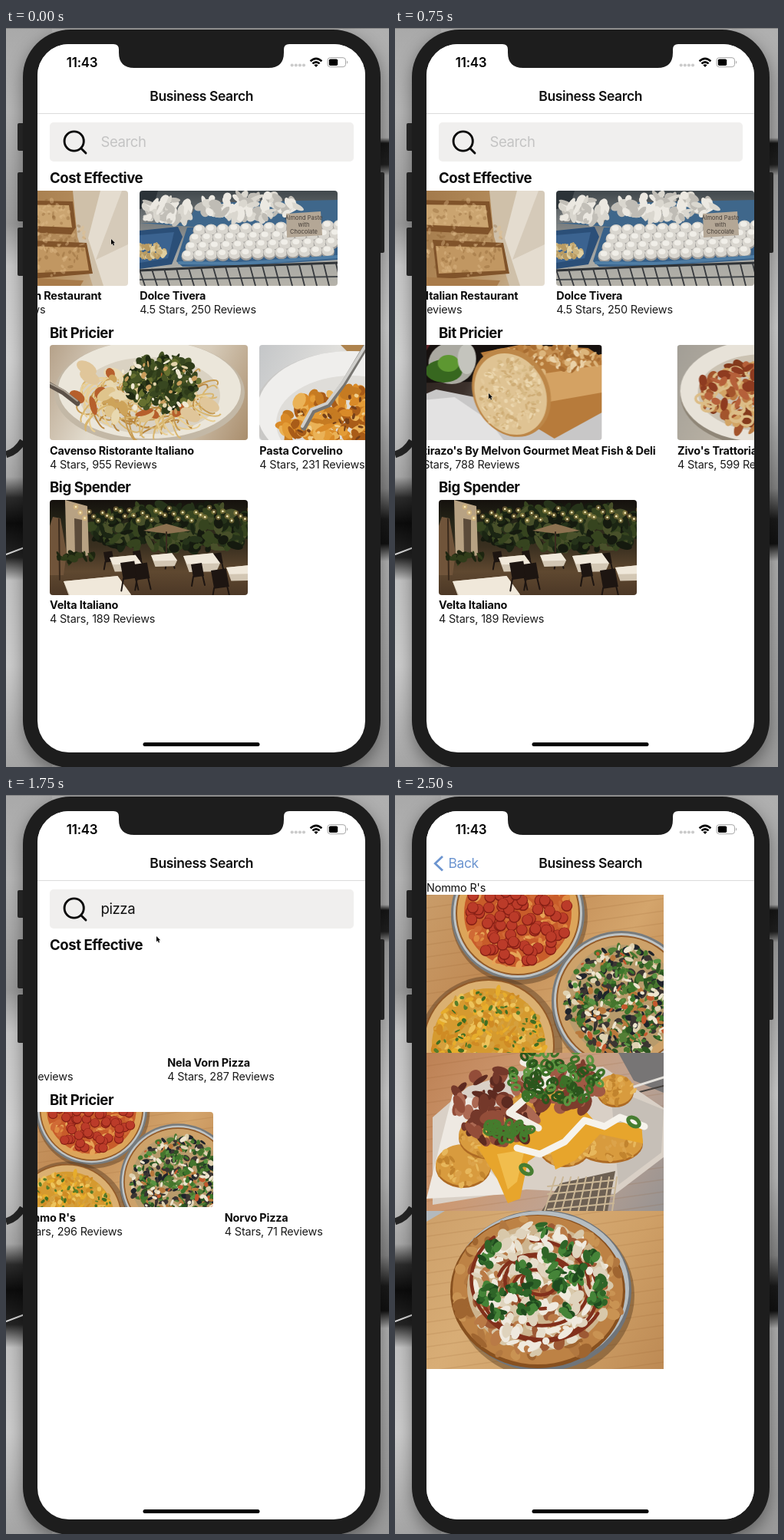
These frames come from a looping animation (499 px wide and 963 px high, 2750 ms). An HTML page with a canvas:

```html
<!DOCTYPE html>
<html lang="en">
<head>
<meta charset="utf-8">
<title>Business Search</title>
<style>
html, body { margin: 0; width: 100%; height: 100%; overflow: hidden; }
#stage { position: relative; width: 499px; height: 963px; overflow: hidden; background: #b4b4b4; font-family: Inter, Roboto, sans-serif; }
#stage div, #stage canvas, #stage svg { position: absolute; }
.layer { left: 0; top: 0; width: 499px; height: 963px; }
.text { line-height: 0; white-space: pre; }
#left, #right { top: 0; height: 963px; }
#left { left: 0; width: 60px; background: linear-gradient(#a9a9a9, #b6b6b6 110px, #9a9a9a 255px, #c8c8c8 310px, #d2d2d2 430px, #bdbdbd 530px, #a8a8a8 585px, #2c2c2c 612px, #0c0c0c 645px, #242424 690px, #c4c4c4 720px, #cdcdcd 830px, #a4a4a4); }
#right { right: 0; width: 60px; background: linear-gradient(#b0b0b0, #a8a8a8 143px, #161616 150px, #202020 178px, #9c9c9c 192px, #b8b8b8 300px, #d0d0d0 390px, #bcbcbc 500px, #858585 600px, #1a1a1a 640px, #111 672px, #b2b2b2 695px, #9a9a9a); }
#body { left: 21.5px; top: 2px; width: 466px; height: 962px; border-radius: 62px; background: #1d1d1d; box-shadow: 0 8px 22px rgba(0, 0, 0, .4); }
#screen { background: #fff; clip-path: inset(21px 31px 19px 41px round 41px); }
#bar { left: 57px; top: 123px; width: 395.5px; height: 51px; border-radius: 5px; background: #f0efee; }
#caret { left: 123.5px; top: 136px; width: 2px; height: 24px; background: #4a72e0; }
#detail { background: #fff; }
#shade { left: 83px; top: 112px; width: 9px; height: 851px; background: linear-gradient(90deg, rgba(0,0,0,0), rgba(0,0,0,.17)); }
#head { left: 0; top: 0; width: 499px; height: 111px; background: #fff; border-bottom: 1px solid #dcdcdc; }
</style>
</head>
<body>
<div id="stage">
  <div id="left"></div><div id="right"></div>
  <svg class="layer" viewBox="0 0 499 963">
    <path d="M0 .5H499" stroke="#858585"/>
    <path d="M0 556Q14 552 22 538" stroke="#252525" stroke-width="9" fill="none"/>
    <path d="M0 686L24 677" stroke="#d8d8d8" stroke-width="2"/>
    <g fill="#2a2a2a"><rect x="15" y="124" width="10" height="36" rx="2"/><rect x="15" y="188" width="10" height="64" rx="2"/><rect x="15" y="260" width="10" height="63" rx="2"/><rect x="483" y="188" width="10" height="105" rx="2"/></g>
  </svg>
  <div id="body"></div>
  <div id="screen" class="layer">
    <div id="home" class="layer">
      <div id="bar"></div>
      <svg class="layer" viewBox="0 0 499 963" fill="none" stroke="#0a0a0a" stroke-width="2.9" stroke-linecap="round"><circle cx="88.7" cy="147.5" r="12.6"/><path d="M98 157L104 163"/></svg>
      <div id="caret"></div>
    </div>
    <div id="detail" class="layer"></div>
    <div id="shade"></div>
    <div id="head"></div>
    <svg class="layer" viewBox="0 0 499 963">
      <path d="M140 20V21Q147 21 147 28V32Q147 52 167 52H342Q362 52 362 32V28Q362 21 369 21V20Z" fill="#1d1d1d"/>
      <g fill="#cbcbcb"><circle cx="372.7" cy="48.5" r="2.1"/><circle cx="377.8" cy="48.5" r="2.1"/><circle cx="382.9" cy="48.5" r="2.1"/><circle cx="388" cy="48.5" r="2.1"/></g>
      <g fill="none" stroke="#000" stroke-width="2.6"><path d="M396.6 43.2Q404 36.4 411.4 43.2"/><path d="M399.4 46.4Q404 42.2 408.6 46.4"/></g>
      <path d="M401.4 48.2Q404 46.2 406.6 48.2L404 51Z"/>
      <rect x="419" y="38.7" width="23.5" height="12" rx="3.4" fill="none" stroke="#a5a5a5"/>
      <rect x="420.8" y="40.4" width="11.4" height="8.6" rx="1.8"/>
      <path d="M444 42.6Q446.4 44.7 444 46.8Z" fill="#a5a5a5"/>
      <rect x="178.5" y="931" width="152" height="5" rx="2.5"/>
      <path id="chevron" d="M62 80L52.3 89.3L62 98.6" fill="none" stroke="#6c95d0" stroke-width="2.8"/>
    </svg>
  </div>
  <svg id="cursor" width="8" height="11" viewBox="-1 -1 8 11"><path d="M0 0V7.2L1.7 5.7L2.9 8.4L4.1 7.9L3 5.3H5.2Z" stroke="#fff" stroke-opacity=".7" stroke-width=".8" paint-order="stroke"/></svg>
</div>
<script>
const $ = id => document.getElementById(id);
const add = (box, tag, css) => {
  const el = document.createElement(tag);
  Object.assign(el.style, css);
  return box.appendChild(el);
};
const layer = box => add(box, 'div', { left: 0, top: 0 });
const text = (box, str, x, base, size, weight = 400, color = '#0c0c0c', shift = 0) => {
  const el = add(box, 'div', {
    left: x + 'px', top: base - .364 * size + 'px', fontSize: size + 'px', fontWeight: weight, color,
    letterSpacing: size > 17 ? '-.023em' : '-.013em', transform: `translateX(${shift}%)`
  });
  el.className = 'text';
  el.textContent = str;
  return el;
};

// Painting helpers, all drawing on the current context
let c;
const rng = seed => {
  let s = seed * 99991 + 7;
  return () => (s = s * 16807 % 2147483647) / 2147483647;
};
const ell = (col, x, y, rx, ry = rx, a = 0) => {
  c.fillStyle = col;
  c.beginPath();
  c.ellipse(x, y, rx, ry, a, 0, 7);
  c.fill();
};
const trace = p => {
  c.beginPath();
  for (let i = 0; i < p.length; i += 2) c.lineTo(p[i], p[i + 1]);
};
const poly = (col, ...p) => { c.fillStyle = col; trace(p); c.fill(); };
const line = (col, w, ...p) => {
  c.strokeStyle = col; c.lineWidth = w; c.lineCap = c.lineJoin = 'round';
  trace(p); c.stroke();
};
const ring = (col, w, x, y, rx, ry = rx, a = 0, from = 0, to = 7) => {
  c.strokeStyle = col; c.lineWidth = w;
  c.beginPath();
  c.ellipse(x, y, rx, ry, a, from, to);
  c.stroke();
};
const wash = (x, y, ...cols) => {
  const g = c.createLinearGradient(0, 0, x, y);
  cols.forEach((col, i) => g.addColorStop(i / (cols.length - 1), col));
  c.fillStyle = g;
  c.fillRect(0, 0, 320, 210);
};
const spread = (seed, n, x, y, rx, ry, draw) => {
  const r = rng(seed);
  for (let i = 0; i < n; i++) {
    const a = r() * 6.283, d = Math.sqrt(r());
    draw(x + Math.cos(a) * d * rx, y + Math.sin(a) * d * ry, r);
  }
};
const bits = (seed, n, x, y, rx, ry, size, ...cols) => spread(seed, n, x, y, rx, ry, (px, py, r) =>
  ell(cols[r() * cols.length | 0], px, py, size * (.5 + r()), size * (.3 + r() * .6), r() * 3));

function toast() {
  wash(258, 124, '#8f6a42', '#a37a4b', '#b58d5c', '#cfc0a8');
  poly('#cfc0a9', 186, 0, 258, 0, 258, 124, 212, 124, 192, 60);
  poly('#e4dccf', 222, 0, 258, 0, 258, 124, 226, 124, 206, 62);
  poly('#d5cab9', 250, 0, 258, 0, 258, 70, 216, 90);
  poly('#80532a', 90, 12, 186, 14, 190, 48, 184, 57, 90, 52);
  poly('#caa470', 90, 18, 181, 19, 185, 48, 90, 44);
  poly('#80532a', 112, 64, 204, 68, 212, 108, 118, 116);
  poly('#c19762', 116, 72, 202, 74, 207, 104, 120, 108);
  poly('#a87b4a', 90, 112, 200, 117, 196, 124, 90, 124);
  bits(3, 160, 150, 62, 52, 50, 3, 'rgba(225,190,140,.4)', 'rgba(130,85,40,.3)');
}
function sweets() {
  wash(0, 124, '#41484c', '#777c7e', '#a4a5a2', '#b6b3aa');
  poly('#2c3338', 0, 0, 24, 0, 18, 20, 0, 24);
  poly('#3f678b', 0, 42, 62, 42, 76, 16, 258, 12, 258, 42, 68, 47);
  bits(5, 55, 36, 26, 34, 15, 7, '#d9d6ce', '#c2bfb8', '#ebe8e1');
  bits(6, 110, 142, 21, 64, 17, 7, '#dad7cf', '#bfbcb5', '#ece9e2');
  poly('#386189', 48, 92, 62, 48, 258, 40, 258, 90, 130, 98, 56, 99);
  for (let j = 0; j < 4; j++) for (let i = 0; i < 13; i++) {
    const x = 78 - j * 5 + i * 15.2, y = 51 + j * 11 - i * .5;
    ell('#9d9b98', x, y + 1.5, 8.6, 8);
    ell('#d9d6cf', x, y, 8, 7);
    ell('#f0eee8', x - 1, y - 2, 4.5, 3.4);
  }
  poly('#2b4f78', 0, 52, 50, 47, 56, 60, 42, 96, 0, 102);
  poly('#3b6390', 0, 58, 45, 54, 37, 88, 0, 94);
  bits(8, 60, 14, 79, 20, 9, 4, '#cbb27c', '#b99b62', '#e0cfa0');
  line('#4f7da4', 4, 52, 94, 130, 95, 258, 86);
  line('#2f3337', 3, 0, 104, 110, 99, 258, 94);
  line('#474b4e', 2, 0, 116, 258, 112);
  for (let i = 0; i < 17; i++) line('#36393d', 1.8, i * 16, 103 - i * .5, i * 16 + 7, 124);
  poly('#b4a796', 191, 30, 236, 27, 238, 58, 192, 61);
  c.fillStyle = '#463e38'; c.font = '7.5px Inter, sans-serif'; c.textAlign = 'center';
  ['Almond Paste', 'with', 'Chocolate'].forEach((s, i) => c.fillText(s, 214, 38 + i * 9));
}
function greens() {
  wash(258, 124, '#b5a189', '#e2dbcd', '#d6cbb9', '#a98d6c');
  ell('#c3b8a6', 130, 62, 124, 68);
  ell('#ebe6da', 130, 58, 119, 64);
  ell('#dad2c2', 130, 66, 92, 50);
  spread(11, 110, 128, 76, 88, 34, (x, y, r) =>
    ring(['#d9b66f', '#c79b51', '#e9cf94', '#b8863f'][r() * 4 | 0], 2, x, y, 10 + r() * 18, 4 + r() * 7, r() * 3, 0, 3.6));
  bits(12, 40, 108, 66, 76, 34, 9, '#dfc48c', '#b65f2c', '#e8d8b0', '#cda35a');
  bits(13, 230, 146, 50, 48, 36, 6, '#2e3b19', '#465424', '#1f2912', '#66702f', '#384720');
  bits(14, 45, 140, 55, 60, 38, 3.5, '#e4d4ab', '#c99d5c', '#f0e8d2');
  [[52, 42], [48, 30], [183, 91], [208, 78]].forEach(p => ell('#e0c69a', ...p, 14, 8, .5));
  line('#5b5148', 7, 0, 52, 18, 62, 36, 76);
  line('#aaa092', 2, 0, 50, 18, 59, 36, 73);
}
function penne() {
  wash(258, 124, '#c4c6c8', '#e0dfdc', '#c2a684', '#513022');
  poly('#ae834d', 106, 0, 160, 0, 160, 12, 120, 14);
  ell('#c9c8c6', 118, 90, 126, 82);
  ell('#efeeec', 118, 86, 121, 78);
  ell('#dfddd9', 120, 102, 98, 62);
  bits(21, 240, 112, 104, 83, 46, 9, '#c67b22', '#e39c37', '#a95c18', '#d98a28', '#eab257');
  bits(22, 35, 104, 96, 60, 34, 3, '#75401a', '#f0cf8e');
  line('#777571', 7, 140, 0, 110, 50, 90, 78, 70, 86, 58, 108);
  line('#d0cfcc', 4, 139, 0, 108, 50, 88, 76, 68, 84, 56, 106);
  poly('#4c3324', 238, 0, 258, 0, 258, 124, 238, 124);
  poly('#a04b2c', 238, 52, 258, 45, 258, 82, 238, 88);
  poly('#26374a', 238, 92, 258, 90, 258, 118, 238, 118);
}
function calamari() {
  wash(258, 124, '#9a4a2a', '#833219', '#a04722', '#8a3115');
  ell('#b5aea0', 130, 64, 122, 75);
  ell('#eeeae0', 130, 59, 121, 72);
  ell('#dfd9cb', 128, 60, 100, 58);
  bits(31, 120, 104, 62, 82, 50, 9, '#d1a667', '#dcb87e', '#c4914e');
  spread(32, 85, 108, 65, 88, 52, (x, y, r) => {
    const w = 7 + r() * 6, a = r() * 3;
    ring('#ad793a', 6.5, x, y + 1, w, w * .7, a);
    ring(['#dfbb81', '#e9cc99', '#d2a560'][r() * 3 | 0], 5, x, y, w, w * .7, a);
  });
  bits(33, 28, 100, 38, 45, 28, 2.5, '#4c5528', '#6a6a32');
  ell('#cfc8bb', 141, 4, 26, 16); ell('#f1e9d5', 141, 1, 22, 13);
  ell('#b9b2a7', 195, 32, 28, 21); ell('#f2efe9', 195, 30, 27, 20);
  ell('#8f1d12', 195, 28, 22, 15); ell('#bd3522', 196, 29, 17, 10);
}
function loaf() {
  wash(258, 124, '#241c19', '#3b302b', '#a49e98', '#c7c3bd');
  poly('#16110f', 0, 0, 258, 0, 258, 22, 90, 48, 0, 50);
  poly('#5a2024', 0, 0, 34, 0, 26, 12, 0, 16);
  ell('#aaa9a1', 62, 24, 30, 27); ell('#37671f', 52, 34, 24, 15); ell('#5d9731', 58, 24, 14, 11);
  ell('#c4c4bd', 82, 18, 12, 20);
  poly('#c8c7c7', 0, 76, 42, 58, 92, 68, 180, 112, 258, 84, 258, 124, 0, 124);
  poly('#e3e2e2', 10, 124, 24, 72, 66, 68, 110, 98, 130, 124);
  poly('#a7a6a7', 0, 124, 8, 88, 22, 82, 28, 124);
  poly('#b77b3b', 100, 10, 150, 0, 240, 4, 258, 16, 258, 88, 196, 122, 160, 100);
  poly('#d4a263', 178, 38, 258, 26, 258, 62, 190, 74);
  bits(41, 110, 190, 18, 66, 18, 5, '#ead1a7', '#c58f51', '#dcb57c', '#a76c31');
  ell('#bd8748', 140, 62, 49, 60, -.48);
  ell('#dfc393', 139, 64, 45, 55, -.48);
  bits(42, 250, 139, 64, 40, 46, 3, '#ebd6ad', '#cfad76', '#e4ca9c', '#d6b984');
}
function tomato() {
  wash(258, 124, '#a29e96', '#c2b9a9', '#b9aa93');
  ell('#8f8677', 108, 64, 104, 68);
  ell('#e7e2d8', 108, 60, 104, 66);
  ell('#cbc2b2', 112, 62, 85, 50);
  bits(51, 110, 106, 66, 74, 44, 9, '#a3542c', '#843a1c', '#d3a565', '#bd7d44');
  spread(52, 30, 98, 68, 68, 38, (x, y) => ring('#dcbd87', 3.5, x, y, 8, 6));
  bits(53, 25, 80, 52, 50, 28, 8, '#8e3b20', '#b5603a');
}
function patio() {
  wash(0, 124, '#15110d', '#262618', '#3b3020', '#5f4830', '#4c3826');
  bits(61, 300, 165, 38, 112, 30, 8, '#26331a', '#36441f', '#1b2513', '#48502a', '#151a0f');
  poly('#b8a283', 20, 0, 49, 8, 51, 72, 22, 78);
  poly('#5b4b3a', 32, 24, 42, 26, 42, 70, 33, 72);
  poly('#70543a', 4, 22, 14, 24, 22, 70, 18, 98, 0, 98, 0, 34);
  line('#3a2a1c', 2, 12, 25, 13, 104);
  poly('#8c7150', 122, 40, 152, 31, 184, 40, 154, 44);
  line('#3b2c20', 2, 152, 42, 152, 72);
  bits(62, 30, 34, 75, 25, 6, 5, '#303c1a', '#1d2510');
  const chair = (x, y, s) => {
    poly('#1d1511', x, y, x + 14 * s, y - 2 * s, x + 17 * s, y + 15 * s, x + 3 * s, y + 17 * s);
    line('#1d1511', 2, x + 3 * s, y + 16 * s, x + s, y + 28 * s);
    line('#1d1511', 2, x + 15 * s, y + 14 * s, x + 18 * s, y + 27 * s);
  };
  const table = (x, y, w) => {
    poly('#d3c7b4', x, y, x + w * .8, y - w * .08, x + w, y + w * .2, x + w * .9, y + w * .42, x + w * .16, y + w * .44);
    poly('#f0e8da', x, y, x + w * .8, y - w * .08, x + w, y + w * .2, x + w * .1, y + w * .22);
  };
  [[70, 68, .8], [108, 67, .7], [150, 70, .7], [212, 70, .8]].forEach(p => chair(...p));
  [[78, 75, 42], [132, 72, 34], [174, 73, 48], [230, 88, 40]].forEach(p => table(...p));
  table(18, 106, 88);
  [[92, 82, 1.3], [110, 84, 1.2], [184, 84, 1], [210, 92, 1.4]].forEach(p => chair(...p));
  for (let i = 0; i < 40; i++) {
    const x = 34 + i * 5.8, y = 9 + 8 * Math.abs(Math.sin(i * .31)) + i % 3 * 5;
    ell('rgba(255,208,110,.3)', x, y, 3.4);
    ell('#fff0bc', x, y, 1.3);
  }
}
function wood(...cols) {
  wash(309, 206, ...cols);
  for (let i = 0; i < 24; i++) line('rgba(135,82,35,.13)', 1.5, -20, i * 16 - 60, 330, i * 16 - 110);
}
function trio() {
  wood('#c99c69', '#c08a54', '#d4a56c', '#b77f49');
  const base = (x, y, r, pan, crust) => {
    ell('rgba(70,45,25,.4)', x + 2, y + 4, r + 2);
    if (pan) { ell('#777b7d', x, y, r); ell('#bfc4c5', x, y, r - 3); }
    ell('#925a28', x, y, r - 6); ell(crust, x, y, r - 8);
  };
  base(119, 24, 87, 1, '#dca55a');
  ell('#c85c2a', 119, 24, 70);
  bits(71, 150, 119, 24, 68, 68, 5, '#df8b42', '#d06a35', '#e6a457');
  spread(72, 85, 119, 24, 66, 66, (x, y) => { ell('#861f15', x, y, 7.4); ell('#bb3b29', x, y - .6, 6.4); });
  base(81, 196, 92, 0, '#dbb071');
  ell('#d59a2f', 81, 196, 74);
  bits(73, 360, 81, 196, 73, 73, 5, '#e7ad2c', '#cf8b24', '#edc35b', '#d5a03d');
  bits(74, 130, 81, 196, 72, 72, 3, '#3f6d21', '#567d29', '#e2a228');
  base(254, 138, 91, 1, '#cda26a');
  ell('#b89b6c', 254, 138, 73);
  bits(75, 460, 254, 138, 73, 73, 5, '#2c5522', '#45752d', '#20242b', '#dfd2b2', '#b9793c', '#537f36', '#3b3532');
  bits(76, 110, 254, 138, 70, 70, 4, '#3c752b', '#589342', '#c3582d', '#eee5cf');
}
function tots() {
  wood('#bd8154', '#cd9870', '#bfa392', '#979392');
  poly('#777575', 250, 0, 309, 0, 309, 52, 270, 36);
  line('#e4e1db', 3, 258, 48, 309, 32);
  line('#45403c', 2, 262, 55, 309, 43);
  poly('#d9d0c6', 8, 84, 54, 44, 120, 24, 230, 18, 309, 72, 309, 136, 246, 184, 130, 178, 8, 198);
  poly('#eee9e2', 0, 190, 34, 54, 84, 64, 70, 140, 110, 184);
  poly('#c6bfb7', 240, 46, 309, 74, 306, 130, 250, 172);
  poly('#6d6053', 150, 206, 174, 170, 246, 154, 236, 206);
  for (let i = 0; i < 9; i++) line('#cbb796', 2, 154 + i * 11, 206, 168 + i * 10, 162);
  for (let i = 0; i < 4; i++) line('#cbb796', 2, 158, 174 + i * 10, 244, 166 + i * 10);
  [[48, 146, 36, 27], [82, 108, 40, 28], [154, 76, 50, 30], [238, 116, 44, 25], [246, 48, 24, 20], [180, 120, 34, 26]].forEach(p => {
    ell('#ad6a24', p[0], p[1] + 3, p[2], p[3]);
    ell('#d89b3e', ...p);
    bits(p[0], 45, ...p, 4, '#e7b75c', '#c2842e', '#dca34a');
  });
  poly('#e7a52c', 66, 122, 114, 116, 162, 66, 200, 68, 222, 92, 280, 90, 282, 118, 226, 106, 194, 140, 168, 152, 160, 122, 132, 142, 122, 190, 106, 196, 92, 164);
  poly('#f1bd4d', 92, 132, 128, 126, 118, 168, 106, 178);
  bits(82, 90, 90, 70, 56, 48, 10, '#74382a', '#934d39', '#5d2a20', '#ac6953');
  bits(83, 45, 176, 44, 50, 32, 10, '#7d3d2d', '#a05a45');
  line('#f3efe7', 9, 126, 12, 150, 22, 160, 36, 138, 52, 124, 64, 108, 78, 146, 98);
  line('#f6f3ec', 9, 118, 124, 148, 132, 180, 116, 206, 88, 232, 96, 252, 84, 284, 96);
  spread(84, 90, 168, 30, 60, 38, (x, y, r) => ring(['#3d7228', '#5c9540', '#2b561d'][r() * 3 | 0], 3.5, x, y, 5, 3.5, r() * 3));
  spread(85, 24, 105, 100, 30, 14, (x, y, r) => ring('#457c2d', 3.5, x, y, 6, 4, r() * 3));
  [[270, 90], [130, 152]].forEach(p => ring('#467d31', 5, ...p, 8, 5, .6));
}
function bbq() {
  wood('#cda06a', '#d8ad76', '#cfa067', '#bd8a54');
  poly('#b3b9bd', 0, 0, 24, 0, 0, 14);
  ell('rgba(70,45,20,.4)', 154, 110, 117, 108);
  ell('#6f7479', 150, 104, 117, 105); ell('#b6bdc1', 149, 101, 115, 101);
  ell('#87501f', 145, 105, 114, 100); ell('#bd8245', 145, 103, 111, 97);
  bits(91, 150, 145, 103, 109, 96, 9, '#c99353', '#9f6530', '#b27840');
  ell('#cdb48e', 146, 100, 93, 82);
  bits(92, 360, 146, 100, 92, 82, 8, '#e7dfcd', '#d8c8aa', '#b97a46', '#f0eadd', '#9d5934');
  for (let i = 0; i < 7; i++)
    ring('#82301b', 4.5, 146, 94 + i % 2 * 8, 22 + i * 11, 15 + i * 10, .2, i * 1.1, i * 1.1 + 3.5);
  bits(93, 75, 146, 100, 88, 78, 8, '#efe9de', '#dfd3bd');
  spread(94, 27, 152, 88, 84, 68, (x, y, r) => bits(1 + r() * 90 | 0, 8, x, y, 9, 8, 6, '#2f6528', '#458438', '#1f4a1e'));
}
function calzone() {
  wash(258, 124, '#77777a', '#cecac4', '#c6c5c3', '#969799');
  poly('#38393d', 226, 0, 258, 0, 258, 40, 246, 18);
  ell('#e7e4df', 130, 78, 128, 82);
  ell('#9e6a35', 150, 70, 92, 60, .3); ell('#d9b57f', 150, 66, 90, 58, .3);
  bits(101, 130, 150, 66, 84, 54, 8, '#e7cc9f', '#c99a5e', '#dfbd88', '#b07a41');
  bits(102, 70, 174, 74, 62, 44, 4, '#54702e', '#8c5129', '#f0e5cc');
}

const photo = (box, x, y, w, h, paint, scale = 1, dy = 0, radius = 4) => {
  const el = add(box, 'canvas', { left: x + 'px', top: y + 'px', borderRadius: radius + 'px' });
  el.width = w; el.height = h;
  c = el.getContext('2d');
  c.translate(0, dy);
  c.scale(scale, scale);
  paint();
  return el;
};
const tops = [211.5, 413.4, 614.6], pitch = 273.3;
// ends: right edges for labels whose start stays off screen
const card = (box, row, x, title, sub, paint, ends) => {
  const y = tops[row], shift = ends ? -100 : 0, [a, b] = ends || [0, 0];
  if (paint) photo(box, x, y, 258, 124, paint);
  text(box, title, x + a, y + 143, 14.44, 700, '#0c0c0c', shift);
  text(box, sub, x + b, y + 160.5, 14.44, 400, '#1a1a1a', shift);
};
const home = $('home');
const [row1, row2, row3, found] = [1, 2, 3, 4].map(() => layer(home));
const heads = ['Cost Effective', 'Bit Pricier', 'Big Spender'].map((s, i) =>
  text(i < 2 ? home : row3, s, 57, tops[i] - 9.5, 18.56, 700));
const query = text(home, '', 123.5, 154.5, 18.56);

card(row1, 0, -63.1, 'Italian Restaurant', '175 Reviews', toast, [223.5, 150.5]);
card(row1, 0, 210.2, 'Dolce Tivera', '4.5 Stars, 250 Reviews', sweets);
[
  ['Cavenso Ristorante Italiano', '4 Stars, 955 Reviews', greens],
  ['Pasta Corvelino', '4 Stars, 231 Reviews', penne],
  ['Brivola Italian Bistro', '4.5 Stars, 594 Reviews', calamari],
  ["Fontirazo's By Melvon Gourmet Meat Fish & Deli", '4.5 Stars, 788 Reviews', loaf]
].forEach((d, i) => card(row2, 1, 57 + i * pitch, ...d));
card(row2, 1, 1233.4, "Zivo's Trattoria", '4 Stars, 599 Reviews', tomato);
card(row3, 2, 57, 'Velta Italiano', '4 Stars, 189 Reviews', patio);

const baked = photo(found, -63.1, tops[0], 258, 124, calzone);
card(found, 0, -63.1, '', '164 Reviews', null, [0, 150.5]);
card(found, 0, 210.2, 'Nela Vorn Pizza', '4 Stars, 287 Reviews');
const pressed = layer(found);
photo(pressed, 11.5, tops[1], 258, 124, trio, .835, -24);
card(pressed, 1, 11.5, "Nommo R's", '4 Stars, 296 Reviews');
card(found, 1, 284.8, 'Norvo Pizza', '4 Stars, 71 Reviews');

const info = layer($('detail'));
text(info, "Nommo R's", 41, 126, 14.44);
[trio, tots, bbq].forEach((p, i) => photo(info, 41, 130 + i * 206, 309, 206, p, 1, 0, 0));

text($('screen'), '11:43', 78.8, 51, 16.9, 600, '#000');
const title = text($('screen'), 'Business Search', 254.7, 95.5, 17.53, 600, '#111', -50);
const back = text($('screen'), 'Back', 69.5, 95.5, 17.53, 400, '#6c95d0');

// One entry per step; each lists only what changes
const stepTime = 250;
const steps = [
  { cursor: [137, 275], row1: -36, row2: 0, query: '', caret: 0, found: 0, baked: 0, press: 1, page: 0 },
  { cursor: [330, 470], row1: 0 },
  { cursor: [320, 473], row2: -533.3 },
  { cursor: [122, 476], row2: -865.4 },
  { cursor: [247, 147] },
  { cursor: [246, 146], caret: 1 },
  { query: 'pizza', caret: 0 },
  { cursor: [196, 184], found: 1 },
  { cursor: [154, 433], baked: 1, press: .9 },
  { press: 1, page: 1 },
  { cursor: null, page: 2 }
];
steps.forEach((s, i) => { if (i) steps[i] = { ...steps[i - 1], ...s }; });

const show = (el, on) => { el.style.display = on ? '' : 'none'; };
const move = (el, x, y = 0) => { el.style.transform = `translate(${x}px, ${y}px)`; };
function render(s) {
  show($('cursor'), s.cursor);
  if (s.cursor) move($('cursor'), s.cursor[0] - 1, s.cursor[1] - 1);
  move(row1, s.row1);
  move(row2, s.row2);
  [row1, row2, row3].forEach(el => show(el, !s.found));
  show(found, s.found);
  show(baked, s.baked);
  pressed.style.opacity = s.press;
  show($('caret'), s.caret);
  query.textContent = s.query || 'Search';
  query.style.color = s.query ? '#111' : '#c4c4c4';
  move(home, s.page ? -112.5 : 0);
  show($('detail'), s.page);
  move($('detail'), s.page === 1 ? 92 : 0);
  show(info, s.page === 2);
  show($('shade'), s.page === 1);
  title.style.opacity = s.page === 1 ? .58 : 1;
  [back, $('chevron')].forEach(el => {
    show(el, s.page);
    el.style.opacity = s.page === 1 ? .65 : 1;
  });
}

const start = performance.now();
let last = -1;
function tick() {
  const i = Math.floor((performance.now() - start) / stepTime) % steps.length;
  if (i !== last) render(steps[last = i]);
  requestAnimationFrame(tick);
}
tick();
</script>
</body>
</html>
```
